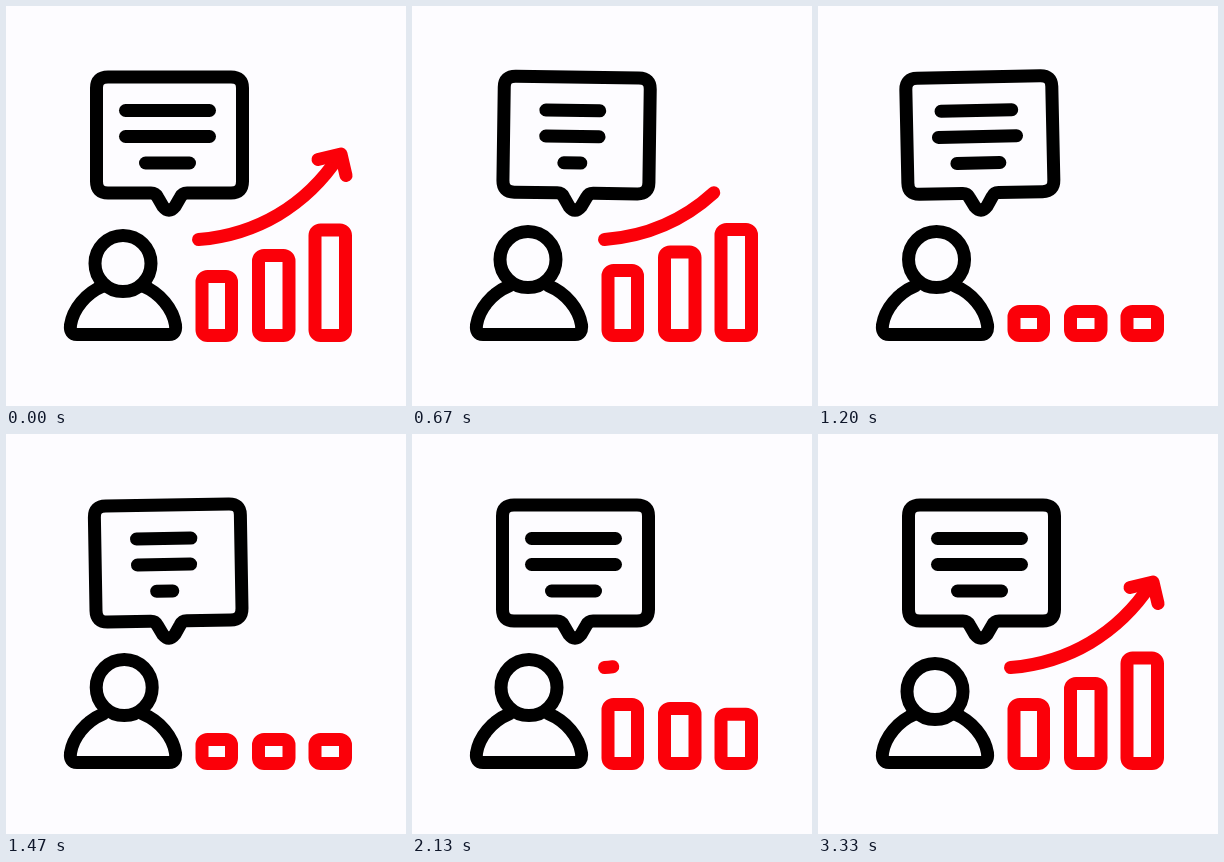
Animation of 400x400 px, one loop 3400 ms. Source, as an HTML page:

```html
<!DOCTYPE html>
<html lang="en">
<head>
<meta charset="utf-8">
<title>Feedback and growth</title>
<style>
  html, body { margin: 0; width: 100%; height: 100%; overflow: hidden; background: #fdfcff; }
  svg { display: block; width: 100vw; height: 100vh; }
  g { fill: none; stroke-width: 13; stroke-linecap: round; stroke-linejoin: round; }
  .ink { stroke: #000; }
  .accent { stroke: #fb0009; }
</style>
</head>
<body>
<svg viewBox="0 0 400 400">
  <g class="ink">
    <path d="M97 280C80 287 67 303 64.500 319Q63.500 328.500 71 328.500H163Q170.500 328.500 169.500 319C167 303 154 287 137 280"/>
    <circle id="head" cx="117" cy="257.500" r="28" fill="#fdfcff"/>
    <g id="bubble">
      <path d="M102 71H225Q236.500 71 236.500 82V175.500Q236.500 187 225 187H181Q176.500 187 174.500 191L169 200.500Q163 208 157 200.500L151.500 191Q149.500 187 145 187H102Q90.500 187 90.500 175.500V82Q90.500 71 102 71Z"/>
      <path class="line"/><path class="line"/><path class="line"/>
    </g>
  </g>
  <g class="accent">
    <rect class="bar" x="196" width="29.500" rx="5.500"/>
    <rect class="bar" x="252.500" width="30.500" rx="5.500"/>
    <rect class="bar" x="309" width="30.500" rx="5.500"/>
    <path id="curve" pathLength="1" d="M192.500 233.500C250 229 300 200 333 150"/>
    <path id="tip" pathLength="1" d="M312 153.500L335 148L340 169.500"/>
    <path class="spark" pathLength="1" d="M53.500 246.500L40 235"/>
    <path class="spark" pathLength="1" d="M48.500 274L24.500 272"/>
    <path class="spark" pathLength="1" d="M47.500 302L33 312"/>
  </g>
</svg>
<script>
const LOOP = 3400, STEP = 1000 / 15;
const byId = id => document.getElementById(id);
const all = selector => [...document.querySelectorAll(selector)];
const head = byId('head'), bubble = byId('bubble'), curve = byId('curve'), tip = byId('tip');
const lines = all('.line'), bars = all('.bar'), sparks = all('.spark');

const BAR_BOTTOM = 329.5, BAR_LOW = 305.5, BAR_LIFT = 6;
const barSpecs = [
  { top: 270.5, rise: 400, grow: 1550, full: 2130 },
  { top: 249.5, rise: 520, grow: 1600, full: 2600 },
  { top: 224, rise: 620, grow: 1600, full: 3020 }
];
const lineSpecs = [[119.5, 203.5, 104.5], [119.5, 203.5, 130.5], [139.5, 183.5, 157]];

const progress = (t, from, to) => Math.min(1, Math.max(0, (t - from) / (to - from)));
const ease = (t, from, to) => (1 - Math.cos(Math.PI * progress(t, from, to))) / 2;

function trim(path, from, to) {
  path.style.visibility = to - from > 0.002 ? 'visible' : 'hidden';
  path.setAttribute('stroke-dasharray', `${Math.max(0, to - from)} 2`);
  path.setAttribute('stroke-dashoffset', -from);
}

// Two dips in line length, the same for every line.
function lineLoss(t) {
  const start = 230, period = 790;
  const phase = (t - start) / period;
  return phase > 0 && phase < 2 ? 31 * Math.sin(Math.PI * phase) ** 2 : 0;
}

function draw(t) {
  const sway = Math.sin(2 * Math.PI * progress(t, 0, 1700));
  bubble.setAttribute('transform', `rotate(${1.3 * sway} 163 205)`);

  const lift = ease(t, 0, 700) - ease(t, 2200, 3250);
  head.setAttribute('transform', `translate(${-1.6 * sway} ${-4 * lift})`);

  lines.forEach((line, i) => {
    const [left, right, y] = lineSpecs[i];
    const loss = lineLoss(t - i * STEP);
    line.setAttribute('d', `M${left + 0.43 * loss} ${y}H${right - 0.57 * loss}`);
  });

  bars.forEach((bar, i) => {
    const { top, rise, grow, full } = barSpecs[i];
    const peak = rise + 260;
    const fall = ease(t, peak, peak + 310);
    const low = fall - ease(t, grow, full);
    const y = top + (BAR_LOW - top) * low - BAR_LIFT * (ease(t, rise, peak) - fall);
    bar.setAttribute('y', y);
    bar.setAttribute('height', BAR_BOTTOM - y);
  });

  trim(curve, 0, 1 - ease(t, 430, 1090) + ease(t, 2045, 2670));
  trim(tip, 0, 1 - ease(t, 70, 430) + ease(t, 2560, 2920));

  const out = 1 - (1 - progress(t, 2670, 2930)) ** 2;
  sparks.forEach(spark => trim(spark, ease(t, 2800, 3220), out));
}

function tick(now) {
  const frame = Math.floor((now % LOOP + 4) / STEP);
  draw(frame * STEP % LOOP);
  requestAnimationFrame(tick);
}
draw(0);
requestAnimationFrame(tick);
</script>
</body>
</html>
```
